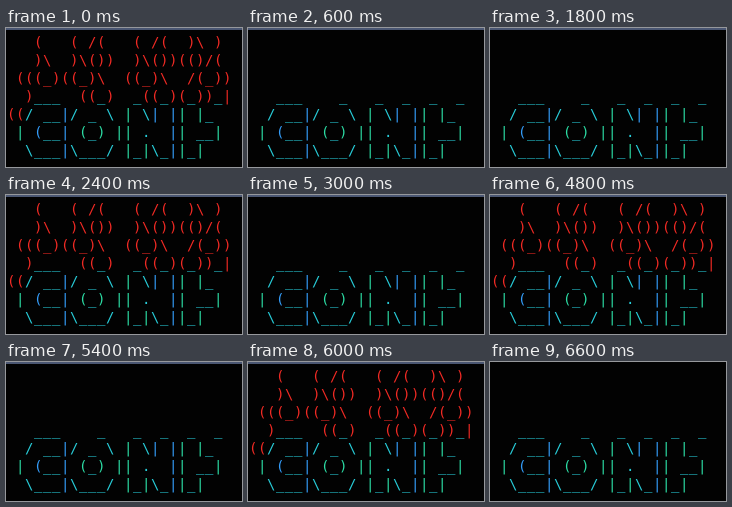
These frames come from a looping animation (236 px wide and 139 px high, 6700 ms). An HTML page:

```html
<!DOCTYPE html>
<html lang="en">
<head>
<meta charset="utf-8">
<title>CONF</title>
<style>
  html, body { margin: 0; width: 100%; height: 100%; overflow: hidden; background: #020202; }
  #bar { position: absolute; top: 0; left: 0; width: 100%; height: 2px; background: #4a5672; }
  pre {
    position: absolute; top: 5px; left: 1px; margin: 0;
    font: 14px/18px "DejaVu Sans Mono", monospace;
    letter-spacing: calc(9px - 1ch);
    color: #28ccd8;
  }
  #fire { color: #f02a24; }
  .blue { color: #349cf8; }
  .green { color: #2cdca4; }
</style>
</head>
<body>
<div id="bar"></div>
<pre id="word"></pre>
<pre id="fire"></pre>
<script>
const LOOP = 6700, BLINK = 600, BAR_END = 6600;
const [bar, word, fire] = ["bar", "word", "fire"].map(id => document.getElementById(id));

const flames = [
  String.raw`   (   ( /(   ( /(  )\ )`,
  String.raw`   )\  )\())  )\())(()/(`,
  String.raw` (((_)((_)\  ((_)\  /(_))`,
  String.raw`  )     (( )   (( )( )) |`,
  "(("
];
const letters = [
  "", "", "",
  String.raw`   ___    _   _  _  _  _`,
  String.raw`  / __|/ _ \ | \| || |_`,
  String.raw` | (__| (_) || .  || __|`,
  String.raw`  \___|\___/ |_|\_||_|`
];

// Upright strokes lean blue or green depending on their column.
const blueColumns = [3, 6, 16, 18];
function tint(ch, col) {
  if (!"|()".includes(ch)) return ch;
  const hue = blueColumns.includes(col) ? "blue" : "green";
  return `<span class="${hue}">${ch}</span>`;
}

fire.textContent = flames.join("\n");
word.innerHTML = letters.map(row => [...row].map(tint).join("")).join("\n");

function show(element, on) {
  element.style.visibility = on ? "visible" : "hidden";
}

function draw(now) {
  const t = now % LOOP;
  show(fire, Math.floor(t / BLINK) % 2 === 0);
  show(bar, t < BAR_END);
}

const start = performance.now();
function tick() {
  draw(performance.now() - start);
  requestAnimationFrame(tick);
}
tick();
</script>
</body>
</html>
```
